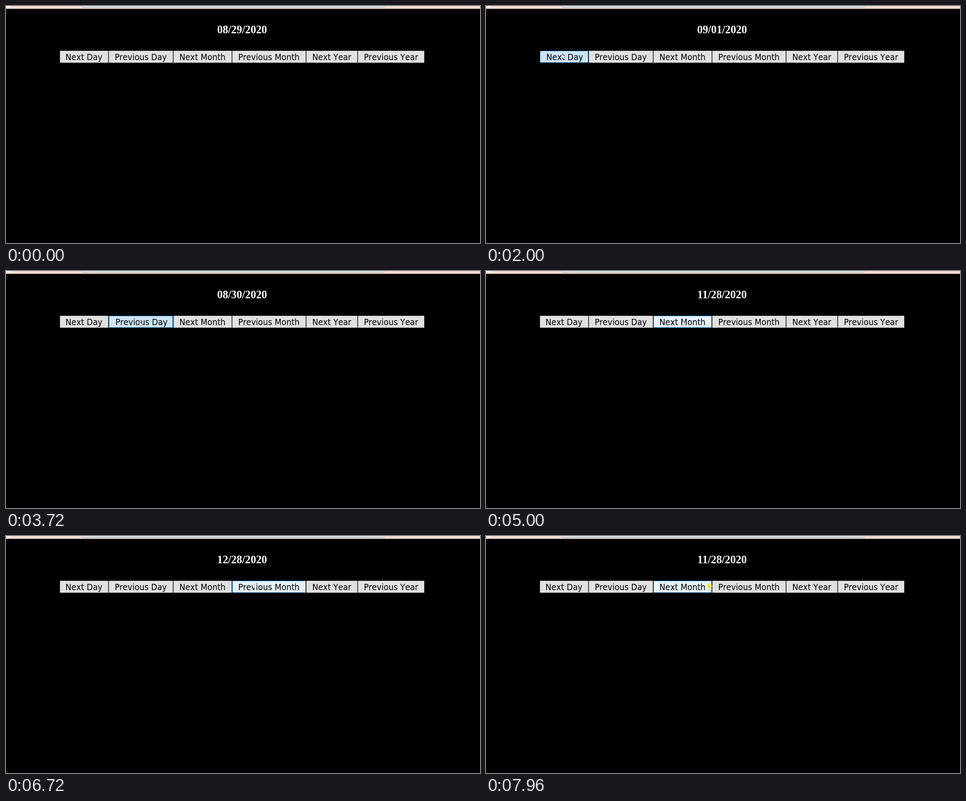
Write an HTML page with a canvas that moves like this. It is 1056 px wide and 530 px high and loops after 8000 ms.

```html
<!DOCTYPE html>
<html lang="en">
<head>
<meta charset="utf-8">
<title>Date stepper</title>
<style>
html, body { margin: 0; width: 100%; height: 100%; overflow: hidden; background: #000; }
canvas { display: block; }
</style>
</head>
<body>
<canvas id="stage" width="1056" height="530"></canvas>
<script>
const ctx = document.getElementById('stage').getContext('2d');
const LOOP = 8000, TICK = 40;
const CLICK_GAP = 180, PRESS_DELAY = 80, RELEASE_DELAY = 120;
const TOP = 100, BOTTOM = 127;

const addDays = n => d => d.setDate(d.getDate() + n);
const addMonths = n => d => d.setMonth(d.getMonth() + n);

const edges = [120, 229, 373, 504, 669, 784, 933];
const buttons = [
  ['Next Day', addDays(1)],
  ['Previous Day', addDays(-1)],
  ['Next Month', addMonths(1)],
  ['Previous Month', addMonths(-1)],
  ['Next Year', addMonths(12)],
  ['Previous Year', addMonths(-12)]
].map(([label, step], i) => ({ label, step, x: edges[i], w: edges[i + 1] - edges[i] - 1 }));

// Evenly spaced runs of clicks on one button.
const run = (button, start, count) =>
  Array.from({ length: count }, (_, i) => ({ button, time: start + i * CLICK_GAP }));
const clicks = [
  run(0, 1200, 1), run(0, 1560, 3), run(0, 2280, 1),
  run(1, 2920, 5), run(1, 3920, 1),
  run(2, 4480, 5), run(3, 6600, 3), run(2, 7760, 2)
].flat();

// The pointer glides from each stop to the next; sag bends the way up or down.
const stops = [
  { x: 984, y: 515, start: 0, end: 120 },
  { x: 184, y: 97, start: 120, end: 920, sag: -110 },
  { x: 169, y: 107, start: 920, end: 1120 },
  { x: 297, y: 113, start: 2400, end: 2840 },
  { x: 438, y: 112, start: 4040, end: 4440, sag: 16 },
  { x: 553, y: 107, start: 5520, end: 6360, sag: 4 },
  { x: 497, y: 112, start: 7120, end: 7640 }
];

function pointerAt(t) {
  if (t < stops[0].end) return null;
  const i = stops.filter(s => s.start <= t).length - 1;
  const to = stops[i], from = stops[i - 1];
  const p = Math.min(1, (t - to.start) / (to.end - to.start));
  const k = p * p * (3 - 2 * p);
  const sag = (to.sag || 0) * 4 * k * (1 - k);
  return { x: from.x + (to.x - from.x) * k, y: from.y + (to.y - from.y) * k + sag };
}

function hoveredAt(t) {
  const p = pointerAt(t);
  if (!p || p.y < TOP || p.y >= BOTTOM) return -1;
  return buttons.findIndex(b => p.x >= b.x && p.x < b.x + b.w);
}

function stateAt(t) {
  const date = new Date(2020, 7, 29);
  const state = { date, focus: -1, active: -1, glow: false, hover: hoveredAt(t - TICK) };
  for (const { button, time } of clicks) {
    const age = t - time;
    if (age < 0) break;
    if (age < PRESS_DELAY) state.glow = true;
    else state.focus = button;
    if (age >= PRESS_DELAY && age < RELEASE_DELAY) state.active = button;
    if (age >= RELEASE_DELAY) buttons[button].step(date);
  }
  return state;
}

function rect(color, x, y, w, h) {
  ctx.fillStyle = color;
  ctx.fillRect(x, y, w, h);
}

function text(value, x, y, font, color, kerning) {
  ctx.font = font;
  ctx.fontKerning = kerning;
  ctx.fillStyle = color;
  ctx.fillText(value, x, y);
}

function drawBrowserEdge() {
  rect('#f3dcd3', 0, 0, 1056, 6);
  rect('#f8efeb', 0, 0, 12, 3);
  rect('#b9c3c5', 169, 0, 674, 4);
  rect('#e2e9ea', 170, 0, 672, 2.5);
  rect('#c9c2bf', 0, 5.5, 1056, 1);
}

function drawButton(b, i, state) {
  const active = i === state.active, hover = i === state.hover, focus = i === state.focus;
  const border = active ? '#005499' : hover || focus ? '#0078d7' : '#adadad';
  const fill = active ? '#cce4f7' : hover ? '#e5f1fb' : '#e1e1e1';
  const line = focus && !hover ? 1.5 : 0.9;
  rect(border, b.x, TOP, b.w, BOTTOM - TOP);
  rect(fill, b.x + line, TOP + line, b.w - 2 * line, BOTTOM - TOP - 2 * line);
  text(b.label, b.x + b.w / 2 + (active ? 1.4 : -0.3), 121,
    '19.7px "DejaVu Sans Condensed", Roboto, sans-serif', '#000', 'none');
}

const arrow = new Path2D('M.3 .4V10L2.5 8 4 11.5 5.5 10.8 4 7.4H7Z');

function drawPointer({ x, y }, glow) {
  ctx.save();
  ctx.translate(x, y);
  if (glow) {
    ctx.fillStyle = 'rgba(245,235,60,.8)';
    ctx.beginPath();
    ctx.arc(0, 0, 6.5, 0, 2 * Math.PI);
    ctx.fill();
  }
  ctx.fillStyle = '#fff';
  ctx.strokeStyle = '#222';
  ctx.lineWidth = 0.7;
  ctx.stroke(arrow);
  ctx.fill(arrow);
  ctx.restore();
}

function draw(t) {
  const state = stateAt(t);
  const pad = n => String(n).padStart(2, '0');
  const d = state.date;
  rect('#000', 0, 0, 1056, 530);
  drawBrowserEdge();
  ctx.textAlign = 'center';
  ctx.textBaseline = 'alphabetic';
  text(`${pad(d.getMonth() + 1)}/${pad(d.getDate())}/${d.getFullYear()}`, 526, 61,
    'bold 24.4px "Liberation Serif", serif', '#fff', 'normal');
  buttons.forEach((b, i) => drawButton(b, i, state));
  const pointer = pointerAt(t);
  if (pointer) drawPointer(pointer, state.glow);
}

const begin = performance.now();
function frame() {
  const t = (performance.now() - begin) % LOOP;
  draw(Math.floor(t / TICK) * TICK);
  requestAnimationFrame(frame);
}
frame();
</script>
</body>
</html>
```
